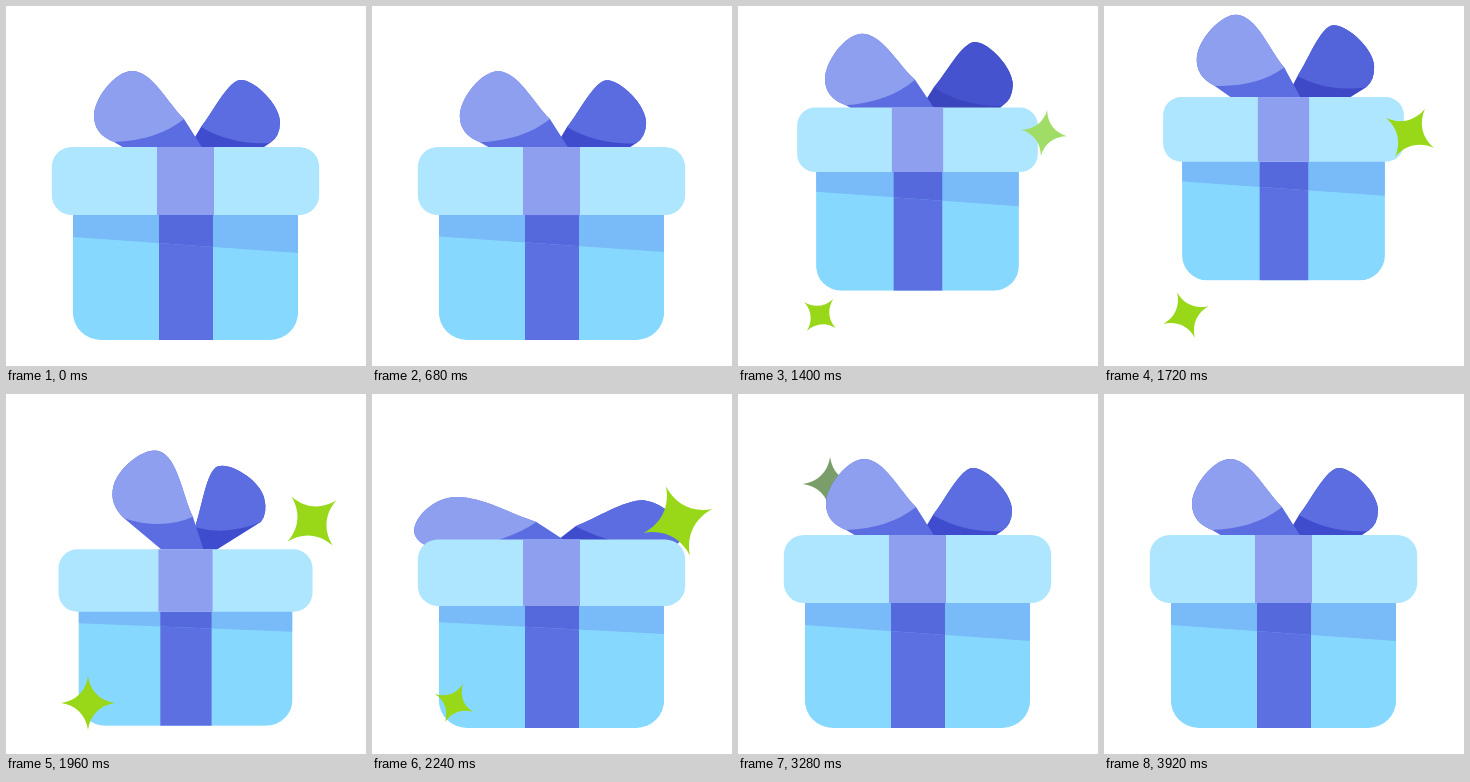
Recreate the animation shown at these times as an HTML page with a canvas. Size 360 px wide and 360 px high, loop 4000 ms.

```html
<!DOCTYPE html>
<html lang="en">
<head>
<meta charset="utf-8">
<title>Gift box</title>
<style>
  html, body { margin: 0; width: 100%; height: 100%; overflow: hidden; background: #fff; }
  canvas { display: block; width: 360px; height: 360px; }
</style>
</head>
<body>
<canvas id="stage" width="360" height="360"></canvas>
<script>
const ctx = document.getElementById('stage').getContext('2d');
const LOOP = 4000, STEP = 40, CENTER = 179.5, FLOOR = 334;

const LIGHT = [143, 159, 240], MID = [91, 109, 224], DEEP = [64, 76, 206];
const LIME = [152, 216, 24], SKY = [135, 216, 255], ICE = [174, 230, 255];

// Loop outlines around the knot: crease, top, side, hem; foot is where the ribbon meets the lid
const leftLoop = {
  crease: [-12, -28], top: [-64, -76], side: [-102, -31], hem: [-82, -5],
  foot: -60, root: 19, turn: 1, bulge: 0.39, sag: 8
};
const rightLoop = {
  crease: [5, -20], top: [45, -67], side: [84, -25], hem: [74, -4],
  foot: 75, root: 0, turn: -1, bulge: 0.32, sag: -4
};

// time, degrees the loops are raised, sideways stretch
const bowKeys = [
  [640, 0, 1], [1040, -4, 1.04], [1400, -2, 1], [1560, -2, 1],
  [1980, 17, 0.93], [2280, -16, 1.4], [2620, 0, 1]
];

const lowStar = { x: 82, y: 309, peak: 27, start: 960, life: 1570, spin: 0.09, tint: SKY };
const rightStar = { x: 306, y: 127, peak: 37, start: 1295, life: 1500, spin: 0.075, tint: ICE };
const highStar = {
  x: 92, y: 90, peak: 27, start: 2300, life: 1500, end: 3400, spin: 0.092, tint: [92, 100, 186]
};

const rgb = c => `rgb(${c.map(Math.round).join()})`;
const clamp = v => Math.min(1, Math.max(0, v));
const lerp = (a, b, p) => a + (b - a) * p;
const mix = (a, b, p) => a.map((v, i) => lerp(v, b[i], p));

function ease(t, from, to) {
  const p = clamp((t - from) / (to - from));
  return p * p * (3 - 2 * p);
}

// Rises from a to b, falls back from c to d
const pulse = (t, a, b, c, d) => ease(t, a, b) - ease(t, c, d);

function fill(color, trace) {
  ctx.fillStyle = color;
  ctx.beginPath();
  trace();
  ctx.closePath();
  ctx.fill();
}

function drawStar({ x, y, peak, start, life, spin, tint, end = start + life }, t) {
  if (t < start || t >= end) return;
  const age = (t - start) / life;
  const grown = lerp(0.58, 1, clamp(age / 0.65));
  const shrunk = clamp((age - 0.65) / 0.35);
  const r = peak * grown * (1 - shrunk * shrunk);
  const lime = clamp(Math.min((t - start) / 160, (end - t) / 240));
  ctx.save();
  ctx.translate(x, y);
  ctx.rotate((t - start) * spin * Math.PI / 180);
  ctx.scale(r, r);
  fill(rgb(mix(tint, LIME, lime)), () => {
    ctx.moveTo(0, -1);
    for (let i = 0; i < 4; i++) {
      ctx.bezierCurveTo(0.08, -0.45, 0.45, -0.08, 1, 0);
      ctx.rotate(Math.PI / 2);
    }
  });
  ctx.restore();
}

function drawLoop(loop, raise, stretch, light, dark) {
  const [cx, cy] = loop.crease, [tx, ty] = loop.top;
  const [sx, sy] = loop.side, [hx, hy] = loop.hem;
  const posed = trace => {
    ctx.save();
    ctx.translate(10, 0);
    ctx.scale(stretch, 1 / stretch);
    ctx.rotate(loop.turn * raise * Math.PI / 180);
    trace();
    ctx.restore();
  };
  const petal = () => {
    ctx.lineTo(cx, cy);
    ctx.bezierCurveTo(lerp(cx, tx, 0.32), lerp(cy, ty, 0.34), lerp(tx, cx, loop.bulge), ty, tx, ty);
    ctx.bezierCurveTo(lerp(tx, sx, loop.bulge + 0.04), ty, sx, lerp(sy, ty, 0.4), sx, sy);
    ctx.quadraticCurveTo(sx, lerp(sy, hy, 0.7), hx, hy);
  };
  fill(dark, () => {
    ctx.moveTo(loop.root, 5);
    posed(petal);
    ctx.lineTo(loop.foot * (1 - 0.037 * raise), 2);
  });
  fill(light, () => posed(() => {
    petal();
    ctx.quadraticCurveTo((cx + hx) / 2 + loop.sag, (cy + hy) / 2 + 10, cx, cy);
  }));
}

function bowPose(t) {
  const next = bowKeys.findIndex(key => key[0] > t);
  if (next < 1) return [0, 1];
  const [from, ...a] = bowKeys[next - 1], [to, ...b] = bowKeys[next];
  return mix(a, b, ease(t, from, to));
}

function drawBow(t, lidTop) {
  const [raise, stretch] = bowPose(t);
  const tone = pulse(t, 640, 1040, 1560, 1840);
  ctx.save();
  ctx.translate(CENTER + 0.5, lidTop);
  drawLoop(rightLoop, raise, stretch,
    rgb(mix(MID, [70, 83, 207], tone)), rgb(mix(DEEP, [58, 69, 190], tone)));
  drawLoop(leftLoop, raise, stretch, rgb(LIGHT), rgb(MID));
  ctx.restore();
}

function boxPose(t) {
  const jump = pulse(t, 1160, 1560, 1600, 2000);
  const shrink = pulse(t, 1080, 1400, 1840, 2080);
  const crouch = pulse(t, 640, 1000, 1060, 1300) + pulse(t, 1840, 2060, 2060, 2360);
  const press = crouch * crouch, tall = 1 - 0.05 * shrink;
  const floor = FLOOR - 76 * jump;
  return {
    floor,
    scale: 1 - 0.1 * shrink,
    lidTop: floor - 193 * tall + 36 * press,
    lidHeight: 68 * tall - 12 * press,
    shade: 1 - 0.1 * shrink - 0.75 * crouch
  };
}

function drawBox({ floor, scale, lidTop, lidHeight, shade }) {
  const lidEnd = lidTop + lidHeight, top = lidEnd - 12;
  const half = 112.7 * scale, lidHalf = 133.7 * scale;
  const left = CENTER - half, right = CENTER + half;
  const strip = (x1, x2, y1, y2, color) => {
    ctx.fillStyle = color;
    ctx.fillRect(CENTER + x1 * scale, y1, (x2 - x1) * scale, y2 - y1);
  };
  const wrap = (paper, ribbon) => {
    ctx.fillStyle = paper;
    ctx.fillRect(left, top, half * 2, floor - top);
    strip(-26.5, 27.5, top, floor, ribbon);
  };

  ctx.save();
  ctx.beginPath();
  ctx.roundRect(left, top, half * 2, floor - top, [0, 0, 28 * scale, 28 * scale]);
  ctx.clip();
  wrap(rgb(SKY), '#5d70e1');
  ctx.beginPath();
  ctx.moveTo(left, top);
  ctx.lineTo(right, top);
  ctx.lineTo(right, lidEnd + 38 * shade);
  ctx.lineTo(left, lidEnd + 22 * shade);
  ctx.clip();
  wrap('#78bbf8', '#5669dc');
  ctx.restore();

  fill(rgb(ICE), () =>
    ctx.roundRect(CENTER - lidHalf, lidTop, lidHalf * 2, lidHeight, 20 * scale));
  strip(-28.5, 28.5, lidTop, lidEnd, rgb(LIGHT));
}

function draw(t) {
  const box = boxPose(t);
  ctx.fillStyle = '#fff';
  ctx.fillRect(0, 0, 360, 360);
  drawStar(highStar, t);
  drawBow(t, box.lidTop);
  drawBox(box);
  drawStar(lowStar, t);
  drawStar(rightStar, t);
}

const begin = performance.now();
function tick() {
  const t = (performance.now() - begin) % LOOP;
  draw(Math.floor(t / STEP) * STEP);
  requestAnimationFrame(tick);
}
tick();
</script>
</body>
</html>
```
